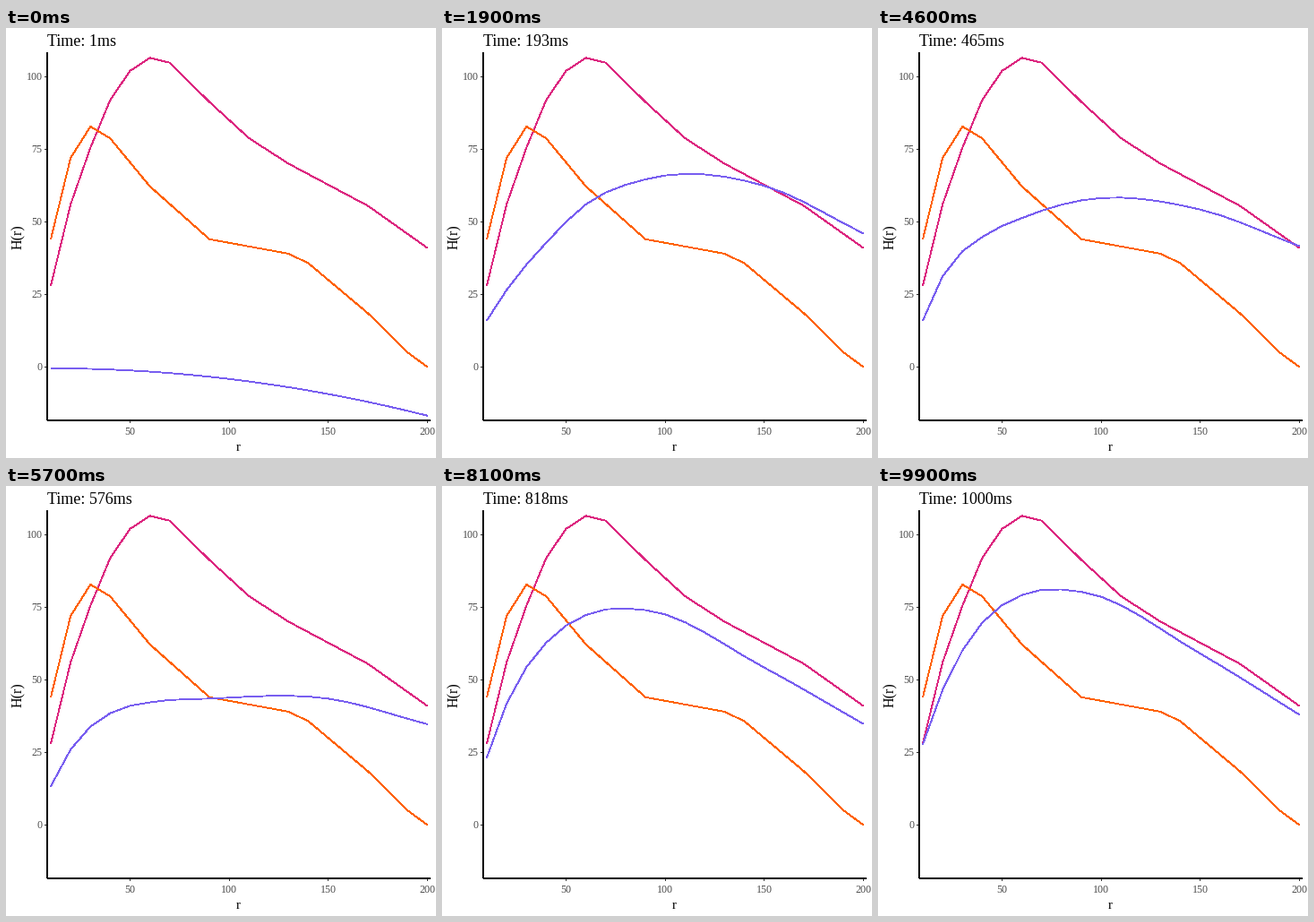
Write a matplotlib script that moves like this. It is 480 by 480 pixels and loops after 10 s.

```python
import numpy as np
import matplotlib.pyplot as plt
from matplotlib.animation import FuncAnimation
from matplotlib.patches import Rectangle

SIZE, DPI = 480, 72
FRAMES, INTERVAL = 100, 100
R = np.arange(10, 201, 10)
KNOTS = np.array([10, 20, 40, 60, 90, 150, 200])
plt.rcParams["font.family"] = "Liberation Serif"


def px(r):
    return 138.5 + (r - 50) * 2.212


def py(h):
    return 378.3 - h * 3.24


def mix(a, b, k):
    return a + (b - a) * k


def smooth(*h):
    """Cubic Hermite curve through heights at KNOTS, sampled at R."""
    h = np.array(h, float)
    slope = np.gradient(h, KNOTS)
    k = np.clip(np.searchsorted(KNOTS, R, "right") - 1, 0, len(KNOTS) - 2)
    w = KNOTS[k + 1] - KNOTS[k]
    t = (R - KNOTS[k]) / w
    return (mix(h[k], h[k + 1], t * t * (3 - 2 * t))
            + w * t * (1 - t) * ((1 - t) * slope[k] - t * slope[k + 1]))


def polyline(*points):
    return np.interp(R, *zip(*points))


upper = polyline((10, 28), (20, 56), (30, 75.5), (40, 92), (50, 102),
                 (60, 106.5), (70, 104.8), (90, 91.3), (110, 78.8),
                 (130, 70), (170, 55.5), (200, 41))
lower = polyline((10, 44), (20, 72), (30, 82.8), (40, 78.7), (60, 62.2),
                 (90, 44), (130, 39), (140, 35.7), (170, 18.5),
                 (190, 5), (200, 0))

# Shapes the moving curve passes through
flat = -0.5 - 16.3 * ((R - 10) / 190) ** 2
rise = smooth(16, 26.5, 42.8, 56, 64.6, 62.4, 46)
crest = smooth(20.5, 38, 55.8, 66, 74, 64, 45.2)
sag = smooth(13.3, 26, 38.5, 42.2, 43.5, 43.5, 34.7)
regain = smooth(21.3, 36.3, 58.3, 67.7, 67.7, 54.6, 35)
climb = smooth(23.2, 41.8, 62.8, 72.3, 74, 54.2, 34.8)
final = smooth(27.8, 46.5, 69.7, 79.2, 80.3, 59, 38)

keys = {
    0: flat,
    11: mix(flat, rise, 0.72),
    19: rise,
    25: mix(rise, crest, 0.5) * 0.8,
    33: crest,
    44: crest,
    50: mix(sag, regain, -0.8),
    57: sag,
    66: regain,
    75: regain,
    81: climb,
    99: final,
}
times = list(keys)
shapes = np.array(list(keys.values()))


def heights(i):
    return np.array([np.interp(i, times, col) for col in shapes.T])


fig = plt.figure(figsize=(SIZE / DPI, SIZE / DPI), dpi=DPI, facecolor="white")
ax = fig.add_axes([0, 0, 1, 1])
ax.set(xlim=(0, SIZE), ylim=(SIZE, 0))
ax.axis("off")


def bar(x, y, w, h, color):
    ax.add_patch(Rectangle((x, y), w, h, color=color, lw=0, antialiased=False))


def trace(h, color):
    # Aliased strokes fill every pixel they touch, so this shows as 2 px
    return ax.plot(px(R), py(h), color=color, lw=0.85, antialiased=False,
                   solid_capstyle="butt", solid_joinstyle="round")[0]


trace(upper, "#DC267F")
trace(lower, "#FE6100")
moving = trace(flat, "#785EF0")

bar(45, 27, 2, 411, "black")
bar(46, 437, 428, 2, "black")
for r in (50, 100, 150, 200):
    bar(int(px(r)), 439, 1, 2, "#333333")
    ax.text(px(r), 453.5, str(r), size=12, color="#4D4D4D", ha="center")
for h in (0, 25, 50, 75, 100):
    bar(43, int(py(h)), 2, 1, "#333333")
    ax.text(40.5, py(h) + 3.4, str(h), size=12, color="#4D4D4D", ha="right")

ax.text(259.5, 472, "r", size=15, ha="center")
ax.text(17.5, 233.5, "H(r)", size=16, rotation=90, rotation_mode="anchor",
        ha="center", va="baseline")
title = ax.text(46, 19.6, "", size=18)


def update(i):
    moving.set_ydata(py(heights(i)))
    title.set_text(f"Time: {round(1 + 999 * i / (FRAMES - 1))}ms")
    return moving, title


anim = FuncAnimation(fig, update, frames=FRAMES, interval=INTERVAL,
                     repeat=True, repeat_delay=0)
plt.show()
```
